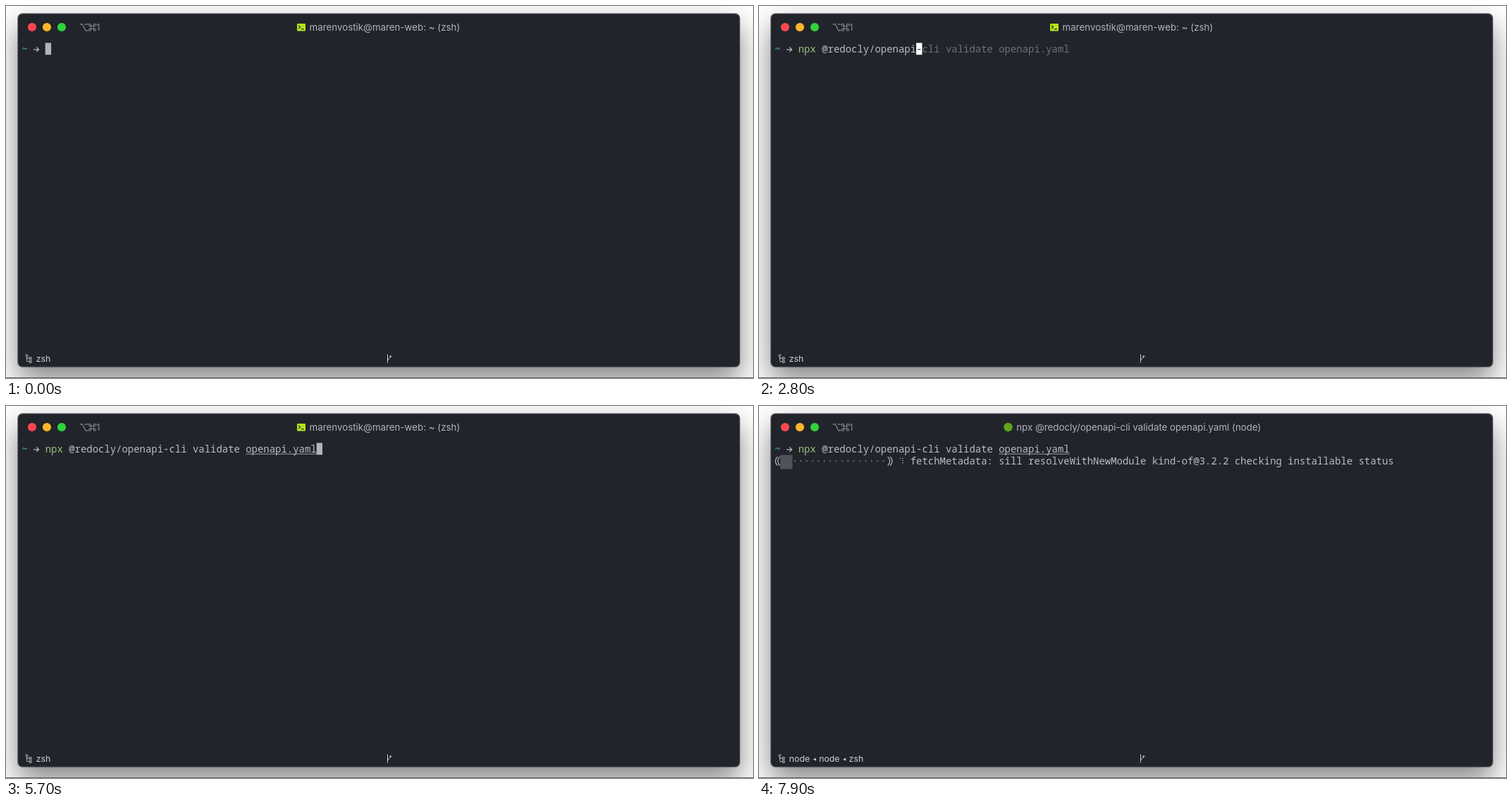
Recreate the animation shown at these times as an HTML page with a canvas. Size 1060x528 px, loop 8 s.

```html
<!DOCTYPE html>
<html lang="en">
<head>
<meta charset="utf-8">
<title>Terminal</title>
<style>
html, body { margin: 0; width: 100%; height: 100%; overflow: hidden; background: #fff; }
canvas { display: block; width: 1060px; height: 528px; }
</style>
</head>
<body>
<canvas id="stage" width="1060" height="528"></canvas>
<script>
const ctx = document.getElementById('stage').getContext('2d');
const LOOP = 8000;
const CELL = 8.368, LEFT = 22.25, LINE1 = 66, LINE2 = 83;
const MONO = '13.95px "Noto Sans Mono", "DejaVu Sans Mono", monospace';
const UI = 'Inter, "Open Sans", sans-serif';
const BG = '#21242b', TEXT = '#babdc4', DIM = '#6d7178', GREEN = '#98c379';

const COMMAND = 'npx @redocly/openapi-cli validate openapi.yaml';
const PATH_AT = COMMAND.lastIndexOf(' ') + 1;
const ENTER = 5800, RUN = 6000, BAR = 6600, CHILD = 6700;

// [time, characters typed]
const TYPING = [
  [0, 0], [300, 1], [400, 3], [700, 4], [800, 5], [900, 6], [1000, 7], [1100, 8], [1200, 9],
  [1700, 10], [1800, 11], [1900, 12], [2000, 13], [2200, 14], [2300, 15], [2400, 16],
  [2600, 17], [2700, 19], [2800, 20], [2900, 21], [3000, 22], [3100, 23], [3200, 25],
  [3300, 26], [3400, 27], [3500, 28], [3600, 29], [3700, 30], [4100, 31], [4200, 32],
  [4300, 34], [4500, 35], [4600, 36], [4700, 37], [5000, 38], [5100, 40],
  [5300, 42], [5400, 43], [5500, 44], [5600, 46]
];

const resolving = pkg =>
  `fetchMetadata: sill resolveWithNewModule ${pkg} checking installable status`;
const SESSION = 'rollbackFailedOptional: verb npm-session 6277e03ebff72591';
// [time, spinner, filled cells, message]
const PROGRESS = [
  [BAR, '⠧', 0, SESSION],
  [6800, '⠇', 0, SESSION],
  [7600, '⠏', 2, 'loadIdealTree:loadAllDepsIntoIdealTree: sill install loadIdealTree'],
  [7700, '⠋', 2, resolving('json-schema-traverse@0.4.1')],
  [7800, '⠙', 2, resolving('is-buffer@1.1.6')],
  [7900, '⠹', 2, resolving('kind-of@3.2.2')]
];

const latest = (steps, t) => steps.filter(s => s[0] <= t).pop();
const colX = col => LEFT + col * CELL;

function text(str, x, y, font, color) {
  ctx.font = font;
  ctx.fillStyle = color;
  ctx.fillText(str, x, y);
}

function mono(str, col, y, color) {
  [...str].forEach((ch, i) => ch !== ' ' && text(ch, colX(col + i), y, MONO, color));
}

function rect(x, y, w, h, color) {
  ctx.fillStyle = color;
  ctx.fillRect(x, y, w, h);
}

function disc(x, y, r, color) {
  ctx.fillStyle = color;
  ctx.beginPath();
  ctx.arc(x, y, r, 0, Math.PI * 2);
  ctx.fill();
}

function stroke(d, color, width = 1.1) {
  ctx.strokeStyle = color;
  ctx.lineWidth = width;
  ctx.stroke(new Path2D(d));
}

function box(x, y, w, h, r) {
  ctx.beginPath();
  ctx.roundRect(x, y, w, h, r);
}

function drawWindow() {
  rect(0, 0, 1060, 528, '#fff');
  ctx.save();
  ctx.shadowColor = 'rgba(0,0,0,.5)';
  ctx.shadowBlur = 40;
  ctx.shadowOffsetY = 18;
  ctx.fillStyle = BG;
  box(17, 11, 1024, 501, 6);
  ctx.fill();
  ctx.restore();
  ctx.lineWidth = 1;
  ctx.strokeStyle = 'rgba(0,0,0,.4)';
  box(16.5, 10.5, 1025, 502, 6.5);
  ctx.stroke();
  ctx.strokeStyle = 'rgba(255,255,255,.06)';
  box(17.5, 11.5, 1023, 500, 5.5);
  ctx.stroke();
  rect(0, 527, 1060, 1, '#626365');
  ['#f9494e', '#fdb62b', '#2fd33c'].forEach((c, i) => disc(37 + 21 * i, 30, 6.1, c));
}

function drawShortcut() {
  const c = '#85888e';
  stroke('M104.6 25.8h3.6l4.6 9h3.8M111.6 25.8h5', c, 1.2);
  stroke('M120.4 28.2h4v4h-4zM120.4 28.2v-1.5a1.5 1.5 0 1 0-1.5 1.5h1.5' +
    'M124.4 28.2h1.5a1.5 1.5 0 1 0-1.5-1.5v1.5M124.4 32.2v1.5a1.5 1.5 0 1 0 1.5-1.5h-1.5' +
    'M120.4 32.2h-1.5a1.5 1.5 0 1 0 1.5 1.5v-1.5', c);
  text('1', 127.9, 35, '13.4px ' + UI, c);
}

function drawTitle(running) {
  const font = '13.32px ' + UI, color = '#b1b4ba';
  if (running) {
    disc(353.5, 30, 6.2, '#5fa61c');
    text(COMMAND + ' (node)', 365.2, 34.6, font, color);
    return;
  }
  ctx.fillStyle = '#b5e31a';
  box(413, 25, 12, 10.4, 1);
  ctx.fill();
  stroke('M415 27.4l2.6 2.3-2.6 2.3M418.8 32.6h4', BG, 1.1);
  text('marenvostik@maren-web: ~ (zsh)', 430.6, 34.6, font, color);
}

function drawStatus(jobs) {
  const c = '#cccfd4';
  stroke('M31 496.2a1.5 1.5 0 1 1-3 0a1.5 1.5 0 1 1 3 0' +
    'M29.5 497.8v5.8q0 1 1 1h2.6M29.5 500h3.6' +
    'M33.3 498.6h2.8v2.8h-2.8zM33.3 503.4h2.8v2.8h-2.8z', c, .9);
  stroke('M541.5 494.6v11.8M541.5 503.4q0-2 2.2-2.9t2.2-3.8M543.9 498.2l2-2 1.8 2', c, 1);
  jobs.forEach((job, i) => {
    const x = 42.8 + 42.4 * i;
    text(job, x, 505.2, '12.3px ' + UI, c);
    if (job === 'zsh') return;
    ctx.fillStyle = c;
    ctx.fill(new Path2D(`M${x + 34} 501.6l4-2.1v4.2z`));
  });
}

function drawPrompt(t) {
  const typed = latest(TYPING, t)[1];
  const first = 4;
  mono('~', 0, LINE1, '#52c2bd');
  stroke('M39.2 61.8h7.2M43.2 58.4l3.4 3.4-3.4 3.4', TEXT, 1.2);
  if (typed) {
    [...COMMAND].forEach((ch, i) => {
      const color = i >= typed ? DIM : i < 3 ? GREEN : TEXT;
      mono(ch, first + i, LINE1, color);
    });
  }
  if (typed > PATH_AT) {
    rect(colX(first + PATH_AT), 67.6, (typed - PATH_AT) * CELL, 1, '#a2a5ab');
  }
  if (t < ENTER) {
    const covers = typed > 0 && typed < COMMAND.length;
    rect(colX(first + typed), 52.4, CELL, 16.8, covers ? '#fff' : '#b1b4bd');
    if (covers) mono(COMMAND[typed], first + typed, LINE1, BG);
  } else if (t < BAR) {
    rect(LEFT, 69.2, CELL, 16.8, '#b1b4bd');
  }
}

function drawSpinner(ch) {
  const bits = ch.codePointAt(0) - 0x2800;
  for (let i = 0; i < 6; i++) {
    if (bits >> i & 1) disc(200.6 + 3.4 * (i > 2), 74.4 + 3.2 * (i % 3), .75, TEXT);
  }
}

function drawShade(x, w) {
  rect(x, 69.5, w, 20, '#44474e');
  for (let y = 70; y < 89; y += 2) rect(x, y, w, 1, '#6b6e75');
  for (let i = 2; i < w; i += 2.1) rect(x + i, 69.5, .5, 20, 'rgba(33,36,43,.6)');
}

function drawProgress(t) {
  const [, spinner, filled, message] = latest(PROGRESS, t);
  stroke('M26.4 71.8q-6.4 6.4 0 12.8M29.8 71.8q-6.4 6.4 0 12.8', TEXT);
  stroke('M182.6 71.8q6.4 6.4 0 12.8M186 71.8q6.4 6.4 0 12.8', TEXT);
  for (let col = filled + 1; col <= 18; col++) disc(colX(col) + 3.6, 78, .8, TEXT);
  if (filled) drawShade(colX(1), filled * CELL);
  drawSpinner(spinner);
  mono(message, 23, LINE2, TEXT);
}

function draw(t) {
  drawWindow();
  drawShortcut();
  drawTitle(t >= RUN);
  drawStatus(t >= CHILD ? ['node', 'node', 'zsh'] : t >= RUN ? ['node', 'zsh'] : ['zsh']);
  drawPrompt(t);
  if (t >= BAR) drawProgress(t);
}

const start = performance.now();
function tick() {
  draw((performance.now() - start) % LOOP);
  requestAnimationFrame(tick);
}
tick();
</script>
</body>
</html>
```
